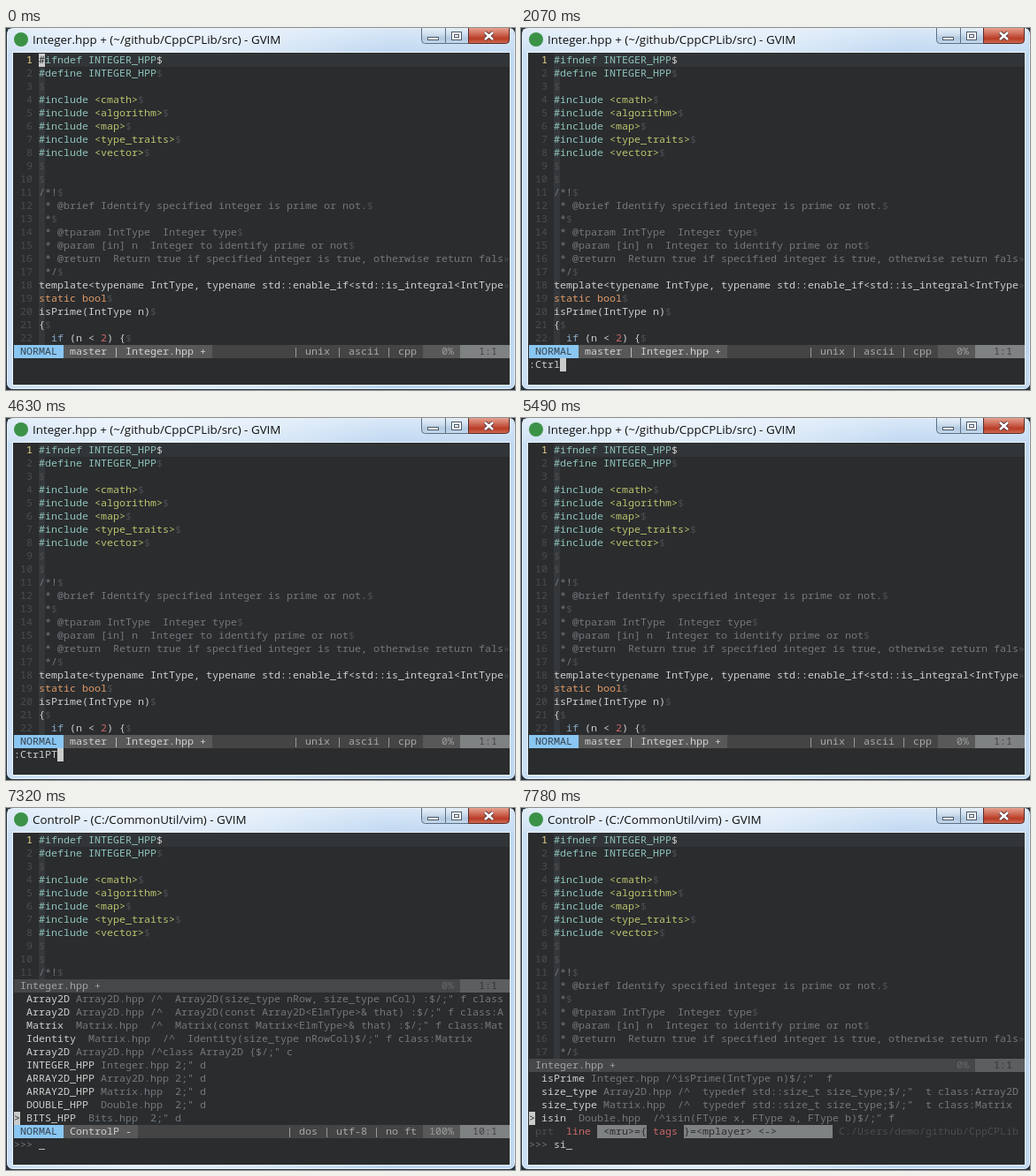
An HTML page with a canvas that plays this animation: 575 px wide and 410 px high, repeating every 8000 ms.

```html
<!DOCTYPE html>
<html lang="en">
<head>
<meta charset="utf-8">
<title>Editor tag search</title>
<style>
html, body { margin: 0; width: 100%; height: 100%; overflow: hidden; }
canvas { display: block; width: 575px; height: 410px; }
</style>
</head>
<body>
<canvas id="stage" width="575" height="410"></canvas>
<script>
const ctx = document.getElementById('stage').getContext('2d');
const LOOP = 8000;
const LEFT = 9, TOP = 29, CELL_W = 7, CELL_H = 15, COLS = 80;

const C = {
  bg: '#2a2c2e', line: '#323538', column: '#35383b',
  text: '#cdd0cd', dim: '#4a4d50', comment: '#73787c',
  teal: '#8fc4bc', green: '#bcc46e', orange: '#de9a68', blue: '#8aabc8', red: '#cc6666',
  yellow: '#f0d98a', grey: '#7f8283', block: '#c9ccca'
};

const pre = s => [[s, C.teal]];
const include = s => [['#include ', C.teal], [`<${s}>`, C.green]];
const note = s => [[s, C.comment]];

const SOURCE = [
  pre('#ifndef INTEGER_HPP'),
  pre('#define INTEGER_HPP'),
  [],
  ...['cmath', 'algorithm', 'map', 'type_traits', 'vector'].map(include),
  [],
  [],
  note('/*!'),
  note(' * @brief Identify specified integer is prime or not.'),
  note(' *'),
  note(' * @tparam IntType  Integer type'),
  note(' * @param [in] n  Integer to identify prime or not'),
  note(' * @return  Return true if specified integer is true, otherwise return false'),
  note(' */'),
  [['template<typename IntType, typename std::enable_if<std::is_integral<IntType>', C.text]],
  [['static bool', C.orange]],
  [['isPrime(IntType n)', C.text]],
  [['{', C.text]],
  [['  ', C.text], ['if', C.blue], [' (n < ', C.text], ['2', C.red], [') {', C.text]]
];

// Each entry is a tag name followed by the rest of its line.
const ALL_TAGS = [
  ['Array2D', ' Array2D.hpp /^  Array2D(size_type nRow, size_type nCol) :$/;" f class'],
  ['Array2D', ' Array2D.hpp /^  Array2D(const Array2D<ElmType>& that) :$/;" f class:A'],
  ['Matrix', '  Matrix.hpp  /^  Matrix(const Matrix<ElmType>& that) :$/;" f class:Mat'],
  ['Identity', '  Matrix.hpp  /^  Identity(size_type nRowCol)$/;" f class:Matrix'],
  ['Array2D', ' Array2D.hpp /^class Array2D {$/;" c'],
  ['INTEGER_HPP', ' Integer.hpp 2;" d'],
  ['ARRAY2D_HPP', ' Array2D.hpp 2;" d'],
  ['ARRAY2D_HPP', ' Matrix.hpp  2;" d'],
  ['DOUBLE_HPP', '  Double.hpp  2;" d'],
  ['BITS_HPP', '  Bits.hpp  2;" d']
];

const bitTag = (name, type, gap = '  ') => [name, ` Bits.hpp  /^${name}(${type} n)$/;"${gap}f`];
const S_TAGS = [
  ...[64, 32, 16].map(n => bitTag('bsr', `std::uint${n}_t`)),
  ...[64, 32, 16].map(n => bitTag('bsf', `std::uint${n}_t`)),
  bitTag('bsf', 'std::uint8_t', ' '),
  bitTag('bsr', 'T'),
  bitTag('bfs', 'T'),
  ALL_TAGS[9]
];

const sizeTag = (file, owner) =>
  ['size_type', ` ${file}/^  typedef std::size_t size_type;$/;"  t class:${owner}`];
const SI_TAGS = [
  ['isPrime', ' Integer.hpp /^isPrime(IntType n)$/;"  f'],
  sizeTag('Array2D.hpp ', 'Array2D'),
  sizeTag('Matrix.hpp  ', 'Matrix'),
  ['isin', '  Double.hpp  /^isin(FType x, FType a, FType b)$/;" f']
];

// Command line text from each moment on; null means no command line.
const TYPING = [
  [0, null], [1240, ':'], [1490, ':C'], [1770, ':Ct'], [1920, ':Ctr'], [2070, ':Ctrl'],
  [2370, ':Ctrlp'], [2770, ':Ctrl'], [3080, ':CtrlP'], [4630, ':CtrlPT'],
  [4780, ':CtrlPTa'], [4900, ':CtrlPTag'], [5490, '']
];

const SEARCH = [
  [5760, ALL_TAGS, ''], [7630, S_TAGS, 's'], [7780, SI_TAGS, 'si']
];

const latest = (steps, t) => steps.filter(step => step[0] <= t).pop();

function fillCells(col, row, count, color) {
  ctx.fillStyle = color;
  ctx.fillRect(LEFT + col * CELL_W, TOP + row * CELL_H, count * CELL_W, CELL_H);
}

function put(col, row, text, color, bg) {
  if (bg) fillCells(col, row, text.length, bg);
  ctx.fillStyle = color;
  [...text].forEach((ch, i) => {
    if (ch !== ' ') ctx.fillText(ch, LEFT + (col + i) * CELL_W, TOP + row * CELL_H + 11);
  });
  return col + text.length;
}

function roundBox(x, y, w, h, radii, fill, stroke) {
  ctx.beginPath();
  ctx.roundRect(x, y, w, h, radii);
  ctx.fillStyle = fill;
  ctx.fill();
  ctx.strokeStyle = stroke;
  ctx.stroke();
}

function gradient(x0, y0, x1, y1, ...colors) {
  const g = ctx.createLinearGradient(x0, y0, x1, y1);
  colors.forEach((c, i) => g.addColorStop(i / (colors.length - 1), c));
  return g;
}

function drawWindow(title) {
  ctx.lineWidth = 1;
  ctx.fillStyle = '#26323e';
  ctx.fillRect(0, 0, 575, 410);
  roundBox(1.5, 0.5, 573, 408, 6,
    gradient(0, 0, 575, 0, '#c9def3', '#e3eefa', '#d6e6f7', '#b9d4f0', '#bfd8f1'), '#e6f1fb');
  ctx.fillStyle = gradient(0, 1, 0, 28, 'rgba(255,255,255,.45)', 'rgba(255,255,255,.1)');
  ctx.fillRect(2, 1, 571, 27);

  ctx.fillStyle = '#3b9247';
  ctx.beginPath();
  ctx.arc(17, 13, 8, 0, Math.PI * 2);
  ctx.fill();

  ctx.font = '13.4px "Open Sans", sans-serif';
  ctx.fillStyle = '#101010';
  ctx.fillText(title, 30, 18);

  const glass = gradient(0, 0, 0, 18, '#e6eff8', '#d3e2f1', '#b2c9e0', '#cadcee');
  const edge = '#5b6f85';
  roundBox(469.5, -0.5, 27, 18, [0, 0, 0, 4], glass, edge);
  roundBox(496.5, -0.5, 26, 18, 0, glass, edge);
  roundBox(522.5, -0.5, 46, 18, [0, 0, 4, 0],
    gradient(0, 0, 0, 18, '#e5a08f', '#d0705c', '#b83b25', '#d3745a'), '#5a2a28');
  ctx.strokeStyle = '#4b5968';
  ctx.fillStyle = '#ffffff';
  ctx.fillRect(476.5, 10.5, 12, 3);
  ctx.strokeRect(476.5, 10.5, 12, 3);
  ctx.fillRect(503.5, 4.5, 11, 9);
  ctx.strokeRect(503.5, 4.5, 11, 9);
  ctx.strokeRect(506.5, 7.5, 5, 3);

  for (const [color, width] of [['#5c3b3f', 4.5], ['#ffffff', 2.5]]) {
    ctx.strokeStyle = color;
    ctx.lineWidth = width;
    ctx.beginPath();
    ctx.moveTo(541, 5); ctx.lineTo(550, 13);
    ctx.moveTo(550, 5); ctx.lineTo(541, 13);
    ctx.stroke();
  }

  // Light rim around the dark client area.
  ctx.fillStyle = '#e8f2fb';
  ctx.fillRect(7, 27, 563, 378);
  ctx.fillStyle = C.bg;
  ctx.fillRect(8, 28, 561, 376);
  ctx.font = '11.667px "Noto Sans Mono", "DejaVu Sans Mono", monospace';
}

function drawSource(count) {
  fillCells(4, 0, 76, C.line);
  for (let row = 1; row < count; row++) fillCells(4, row, 1, C.column);
  SOURCE.slice(0, count).forEach((runs, row) => {
    put(0, row, String(row + 1).padStart(3), row ? C.dim : C.yellow);
    let col = 4;
    for (const [text, color] of runs) col = put(col, row, text.slice(0, COLS - 1 - col), color);
    const cut = col === COLS - 1;
    put(col, row, cut ? '»' : '$', row ? C.dim : C.text);
  });
}

function drawStatus(name, info, percent, position) {
  fillCells(0, 22, COLS, '#444444');
  const col = put(0, 22, ' NORMAL ', '#34434f', '#8ac6f2');
  put(col, 22, ` ${name} `, '#d0d0d0', '#585858');
  put(66 - info.length, 22, info, '#a8a8a8');
  put(66, 22, percent, '#999c9e', '#585858');
  put(72, 22, position, '#444444', C.grey);
}

function drawMenu() {
  fillCells(0, 22, COLS, C.grey);
  put(0, 22, 'CtrlP', '#000000', '#ffff00');
  put(7, 22, 'CtrlPBookmarkDir  CtrlPBookmarkDirAdd  CtrlPBufTag  CtrlPBufTagAll  >', C.bg);
}

function drawModes() {
  put(1, 22, 'prt', C.dim);
  put(6, 22, 'line', C.red);
  put(11, 22, ' <mru>={', C.bg, C.grey);
  put(20, 22, 'tags', C.red);
  put(25, 22, '}=<mplayer> <->'.padEnd(24), C.bg, C.grey);
  put(50, 22, 'C:/Users/demo/github/CppCPLib', C.dim);
}

function drawEditor(t) {
  const typed = latest(TYPING, t)[1];
  drawWindow('Integer.hpp + (~/github/CppCPLib/src) - GVIM');
  drawSource(SOURCE.length);
  if (t >= 3360 && t < 4630) drawMenu();
  else drawStatus('master | Integer.hpp +', '| unix | ascii | cpp ', '   0% ', '   1:1  ');
  if (typed === null) put(4, 0, '#', C.bg, C.block);
  else if (typed) fillCells(put(0, 23, typed, C.text), 23, 1, C.block);
}

function drawSearch([, tags, query]) {
  const split = 21 - tags.length;
  drawWindow('ControlP - (C:/CommonUtil/vim) - GVIM');
  drawSource(split);

  fillCells(0, split, COLS, '#464748');
  put(1, split, 'Integer.hpp +', '#a0a2a3');
  put(66, split, '   0% ', '#666869');
  put(72, split, '   1:1  ', '#353535', '#5c5e5f');

  tags.forEach(([name, rest], i) => {
    const row = split + 1 + i;
    put(put(2, row, name, C.text), row, rest, C.comment);
  });
  put(0, 21, '>', C.bg, C.block);

  if (query) drawModes();
  else drawStatus('ControlP -', '| dos | utf-8 | no ft ', ' 100% ', '  10:1  ');
  put(0, 23, '>>>', C.comment);
  put(put(4, 23, query, C.text), 23, '_', C.text);
}

const start = performance.now();
function frame() {
  const t = (performance.now() - start) % LOOP;
  const search = latest(SEARCH, t);
  if (search) drawSearch(search);
  else drawEditor(t);
  requestAnimationFrame(frame);
}
frame();
</script>
</body>
</html>
```
